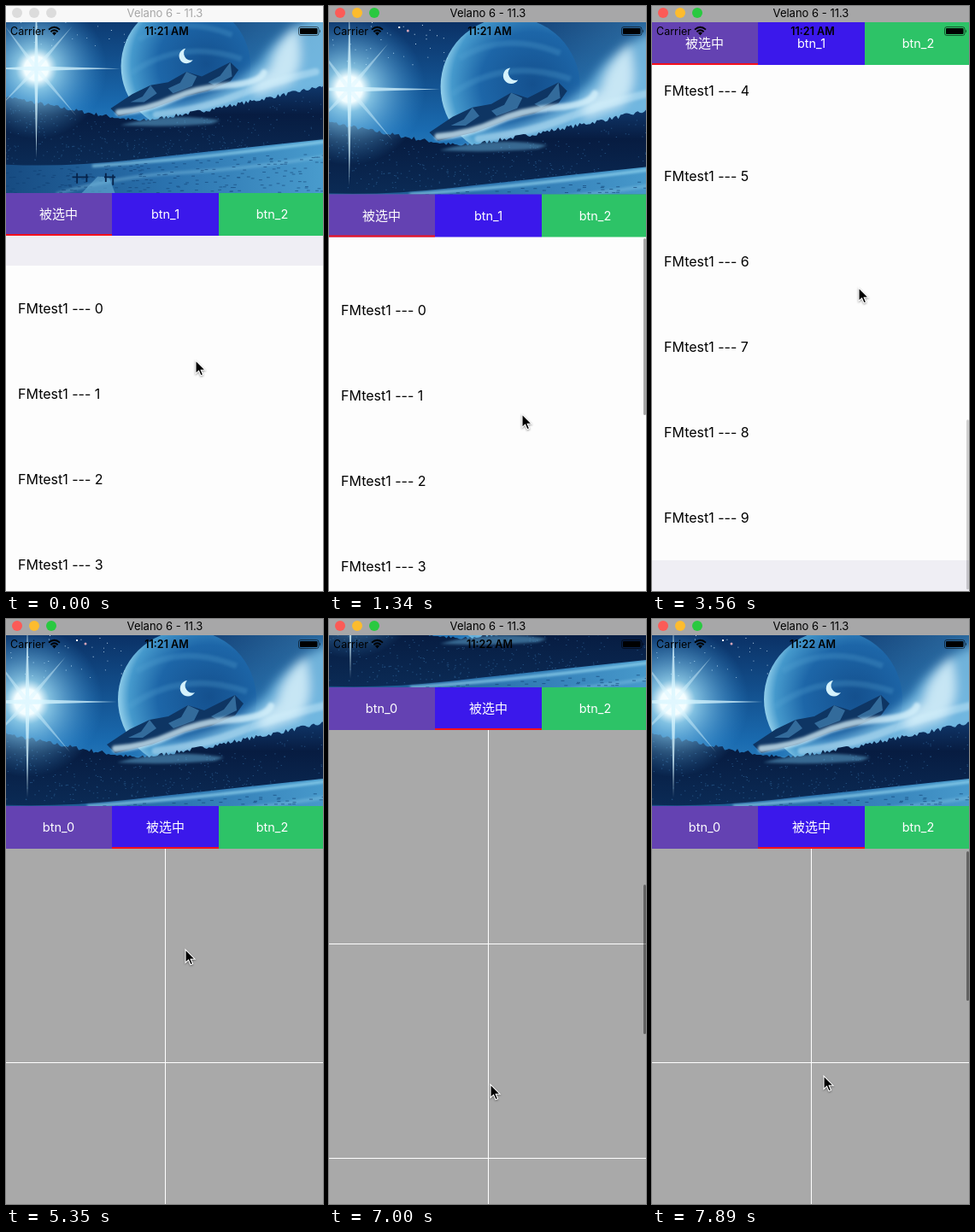
An HTML page that plays this animation: 371 px wide and 685 px high, repeating every 8 s.

```html
<!DOCTYPE html>
<html lang="en">
<head>
<meta charset="utf-8">
<title>Sticky tabs</title>
<style>
html, body { margin: 0; width: 100%; height: 100%; overflow: hidden; background: #fdfdfd; }
#stage { display: block; width: 100vw; height: 100vh; font-family: Inter, "Noto Sans CJK SC", "Noto Sans CJK", "Noto Sans", sans-serif; }
.tab { font-size: 14.5px; fill: #fff; text-anchor: middle; }
.cell { font-size: 16px; fill: #000; white-space: pre; }
.status { font-size: 12.5px; }
</style>
</head>
<body>
<svg id="stage" viewBox="0 0 371 685">
  <defs>
    <linearGradient id="sky" x1="0" y1="0" x2="0" y2="1">
      <stop offset="0" stop-color="#0a2f63"/><stop offset=".5" stop-color="#1a6bb0"/><stop offset="1" stop-color="#59b4e4"/>
    </linearGradient>
    <linearGradient id="east" x1="0" y1="0" x2="1" y2="0">
      <stop offset=".45" stop-color="#4a9fd6" stop-opacity="0"/><stop offset="1" stop-color="#4a9fd6" stop-opacity=".55"/>
    </linearGradient>
    <radialGradient id="planet" cx=".66" cy=".48" r=".68">
      <stop offset="0" stop-color="#14508e"/><stop offset=".55" stop-color="#1d66a8"/><stop offset=".85" stop-color="#4599cc"/><stop offset="1" stop-color="#a5dcf2"/>
    </radialGradient>
    <radialGradient id="glow">
      <stop offset="0" stop-color="#fff"/><stop offset=".17" stop-color="#f2fdff"/><stop offset=".3" stop-color="#a5e2f8" stop-opacity=".75"/><stop offset="1" stop-color="#3c9be0" stop-opacity="0"/>
    </radialGradient>
    <linearGradient id="forest" x1="0" y1="0" x2="0" y2="1">
      <stop offset="0" stop-color="#10386c"/><stop offset=".35" stop-color="#071c41"/><stop offset="1" stop-color="#0b2c57"/>
    </linearGradient>
    <linearGradient id="field" x1="0" y1="0" x2="1" y2="0">
      <stop offset="0" stop-color="#164a80"/><stop offset=".5" stop-color="#2a72ae"/><stop offset="1" stop-color="#4a9dce"/>
    </linearGradient>
    <filter id="soft" x="-30%" y="-50%" width="160%" height="200%"><feGaussianBlur stdDeviation="6"/></filter>
    <filter id="faint" x="-30%" y="-50%" width="160%" height="200%"><feGaussianBlur stdDeviation="1.6"/></filter>
  </defs>

  <rect width="371" height="685" fill="#fdfdfd"/>
  <g id="list">
    <rect id="band" y="269" width="371" height="35" fill="#efeef4"/>
    <rect y="1304" width="371" height="300" fill="#efeef4"/>
  </g>
  <g id="grid">
    <rect y="269" width="371" height="1400" fill="#a9a9a9"/>
    <path d="M186.5 269V1669M0 519.5H371M0 770.5H371M0 1021.5H371" stroke="#fff"/>
  </g>

  <svg id="photo" x="0" width="371" height="200" overflow="hidden">
    <g id="scene">
      <rect x="-20" y="-5" width="411" height="260" fill="url(#sky)"/>
      <rect x="-20" y="-5" width="411" height="260" fill="url(#east)"/>
      <circle cx="212" cy="75" r="81" fill="url(#planet)"/>
      <path d="M153 42Q205 10 270 36M143 84Q205 40 282 66" fill="none" stroke="#5aa9d6" stroke-width="7" opacity=".25" filter="url(#faint)"/>
      <path d="M212 53a9.3 9.3 0 1 0 9 14a8.6 8.6 0 0 1-9-14z" fill="#d5f2fc"/>
      <g filter="url(#soft)">
        <path d="M395 5Q330 25 305 70Q270 105 215 122L150 135L260 140L395 105Z" fill="#8bcdef" opacity=".72"/>
        <path d="M350 25Q322 50 318 78Q285 98 300 112L340 98Q365 78 350 25Z" fill="#e4f7fd" opacity=".75"/>
      </g>
      <path d="M118 128L145 110L168 99L190 95L213 82L232 88L250 79L268 70L278 80L268 94L240 106L210 113L170 128L128 138Z" fill="#0e3563"/>
      <path d="M213 82L205 96L190 103L196 109L220 100L226 88ZM268 70L255 87L240 95L248 99L270 88ZM168 99L158 113L143 120L160 120L176 109Z" fill="#4b8fc2" opacity=".6"/>
      <g fill="none" stroke="#d8f3fc" stroke-linecap="round" filter="url(#faint)">
        <path d="M128 133Q165 130 195 116T265 99T310 83" stroke-width="8" opacity=".75"/>
        <path d="M175 136Q235 128 275 112T375 82" stroke-width="9" opacity=".4"/>
      </g>
      <path id="stars" fill="#d5ecfa"/>
      <path d="M82 5h2v2h-2z" fill="#fff"/><circle cx="93" cy="10" r="1.5" fill="#d7a5b8"/>
      <path id="woods" fill="url(#forest)"/>
      <path id="frost" stroke="#3a78b0" opacity=".5"/>
      <path d="M130 149Q190 132 255 143L245 147Q190 152 130 149Z" fill="#68b4df" opacity=".5" filter="url(#faint)"/>
      <path d="M-20 198Q60 202 140 193T391 166V260H-20Z" fill="url(#field)"/>
      <path d="M95 200Q220 192 391 169" fill="none" stroke="#9bdcf3" stroke-width="3" opacity=".8" filter="url(#faint)"/>
      <path d="M50 235Q130 212 210 208T391 187" fill="none" stroke="#8ccce9" stroke-width="4" opacity=".4" filter="url(#faint)"/>
      <path id="grass" stroke="#0e3c70" opacity=".6"/>
      <path d="M78 238L102 213L116 214L125 238Z" fill="#6fb6dc" opacity=".55"/>
      <path d="M76 222V209M88 220V210M112 220V209M121 224V211M70 214H90M110 214H124" stroke="#06234a" stroke-width="2"/>
      <circle cx="25" cy="78" r="88" fill="url(#glow)"/>
      <g fill="#d8f6ff" opacity=".75">
        <path d="M25 -15L27.500 78L25 190L22.500 78ZM-30 78L25 75L130 78L25 81Z"/>
        <path d="M-14 25L27 76L75 137L23 80ZM70 25L27 80L-20 125L23 76Z" opacity=".6"/>
      </g>
    </g>
  </svg>

  <g id="tabs">
    <rect width="124" height="50" fill="#6442b2"/>
    <rect x="124" width="125" height="50" fill="#3b18eb"/>
    <rect x="249" width="122" height="50" fill="#2dc367"/>
    <text class="tab" x="61.500" y="30"></text>
    <text class="tab" x="186.500" y="30"></text>
    <text class="tab" x="311.500" y="30"></text>
    <rect id="mark" y="48" height="2" fill="#f4101c"/>
  </g>

  <g class="status">
    <text x="5" y="34">Carrier</text>
    <g fill="none" stroke="#000" stroke-width="1.900">
      <path d="M50 27.600Q56.500 21.800 63 27.600M52.400 30.200Q56.500 26.400 60.600 30.200"/>
      <path d="M56.500 34.500L54 31.600Q56.500 29.600 59 31.600Z" fill="#000" stroke="none"/>
    </g>
    <text id="clock" x="188" y="34" text-anchor="middle" font-weight="600"></text>
    <rect x="342.500" y="24.500" width="23.500" height="10" rx="2.500" fill="none" stroke="#000" opacity=".55"/>
    <rect x="344" y="26" width="20.500" height="7" rx="1" />
    <path d="M367 27.500q2 2 0 4z" opacity=".6"/>
  </g>
  <rect id="bar" x="368" width="3" rx="1.500" fill="#000"/>

  <rect id="chrome" width="371" height="19"/>
  <g id="lights"><circle cx="13" cy="8" r="6"/><circle cx="33" cy="8" r="6"/><circle cx="53" cy="8" r="6"/></g>
  <text id="title" x="186" y="13" font-size="13" text-anchor="middle">Velano 6 - 11.3</text>

  <path id="cursor" d="M0 0V15.500L3.600 12.200L6 17.800L8.600 16.700L6.200 11.200H11Z" fill="#000" stroke="#fff" stroke-width="1.100" style="filter:drop-shadow(0 1px 1px #0006)"/>
</svg>
<script>
const $ = id => document.getElementById(id);
const LOOP = 8000, STEP = 148.87, LEAD = 13.5;
const FOCUS = 3, SWITCH = 32, MINUTE = 42;

// [step, offset]; negative offsets pull the header down
const scrollKeys = [
  [0, 0], [2, 0], [3, -15], [4, -40], [5, -58], [6, -62], [7, -35], [8, -10], [9, -1.5],
  [10, 20], [11, 90], [13, 320], [15, 520], [16, 576], [17, 590], [18, 592],
  [20, 660], [21, 685], [22, 680], [23, 664], [24, 655], [25, 655],
  [26, 640], [27, 540], [29, 200], [30, 70], [31, 0], [36, 0],
  [37, -8], [38, -30], [39, -46], [40, -20], [41, -2], [42, 20],
  [44, 130], [45, 175], [46, 165], [47, 139], [48, 75], [49, 10], [50, -25], [51, -14], [53, 0]
];
// [step, x, y]
const cursorKeys = [
  [0, 222, 415], [1, 222, 358], [3, 222, 365], [6, 225, 500], [9, 226, 478], [12, 208, 300],
  [16, 203, 487], [18, 206, 480], [21, 236, 350], [24, 242, 330], [26, 240, 340], [28, 225, 520],
  [30, 205, 400], [32, 190, 240], [33, 190, 240], [36, 210, 387], [39, 206, 500], [41, 204, 520],
  [45, 192, 360], [47, 189, 545], [48, 192, 590], [49, 196, 588], [53, 201, 535]
];

function sample(keys, n, col = 1) {
  const i = keys.findIndex(k => k[0] >= n);
  if (i < 0) return keys[keys.length - 1][col];
  if (i === 0) return keys[0][col];
  const a = keys[i - 1], b = keys[i];
  return a[col] + (b[col] - a[col]) * (n - a[0]) / (b[0] - a[0]);
}

let seed = 7;
const rand = () => (seed = seed * 16807 % 2147483647) / 2147483647;

// Height of the forest edge at x
const ridge = x => 146 - 35 * Math.pow(Math.abs(x - 155) / 190, 1.15);

function buildScene() {
  let d = "M-20 205";
  for (let x = -20; x < 392; x += 2.5) d += `L${x} ${ridge(x) - rand() * 5}`;
  $("woods").setAttribute("d", d + "V205Z");

  const dashes = (count, top, bottom, len) => {
    let p = "";
    for (let i = 0; i < count; i++) {
      const x = rand() * 411 - 20, y = top(x) + rand() * (bottom - top(x));
      p += `M${x.toFixed(1)} ${y.toFixed(1)}h${len}`;
    }
    return p;
  };
  $("frost").setAttribute("d", dashes(420, x => ridge(x) + 6, 198, 1.3));
  $("grass").setAttribute("d", dashes(260, x => 206 - x * .06, 240, 4));

  let s = "";
  for (let i = 0; i < 34; i++) s += `M${(rand() * 140).toFixed(1)} ${(rand() * 50).toFixed(1)}h.9v.9h-.9z`;
  $("stars").setAttribute("d", s);
}

function buildList() {
  for (let i = 0; i < 10; i++) {
    const t = document.createElementNS("http://www.w3.org/2000/svg", "text");
    t.setAttribute("class", "cell");
    t.setAttribute("x", 14);
    t.setAttribute("y", 360 + i * 100);
    t.textContent = `FMtest1 --- ${i}`;
    $("list").append(t);
  }
}

const labels = [...document.querySelectorAll(".tab")];
const lights = [...$("lights").children];
const set = (id, attrs) => {
  for (const k in attrs) $(id).setAttribute(k, attrs[k]);
};
const move = (id, x, y) => set(id, { transform: `translate(${x} ${y})` });

function barOpacity(n) {
  if (n < FOCUS || n === 25 || (n >= SWITCH && n < 37)) return 0;
  if (n === 24) return .18;
  return n < SWITCH ? .35 : .42;
}

function draw(t) {
  const n = Math.floor((t + LEAD) / STEP);
  const s = sample(scrollKeys, n), pull = Math.max(0, -s), down = Math.max(0, s);
  const active = n >= FOCUS, page = n >= SWITCH ? 1 : 0;

  move("list", 0, -s);
  move("grid", 0, -s);
  $("list").style.display = page ? "none" : "";
  $("grid").style.display = page ? "" : "none";
  $("band").style.display = active ? "none" : "";

  const k = active ? 1 + pull / 200 : .935;
  set("photo", { y: 19 - down, height: 200 + pull });
  set("scene", { transform: `translate(${186 * (1 - k)} ${active ? 0 : -18.7}) scale(${k})` });

  move("tabs", 0, Math.max(19, 219 - s));
  labels.forEach((el, i) => {
    el.textContent = i === page ? "被选中" : `btn_${i}`;
    el.style.fontSize = i === page ? "15px" : "";
  });
  set("mark", { x: page * 124, width: 124 + page });

  $("clock").textContent = n >= MINUTE ? "11:22 AM" : "11:21 AM";
  set("bar", {
    y: 272 + down * (page ? .28 : .324),
    height: page ? 175 : 207 - Math.min(8, down / 70),
    opacity: barOpacity(n)
  });

  set("chrome", { fill: active ? "#a7a7a8" : "#f8f8f8" });
  set("title", { fill: active ? "#000" : "#a6a6a6" });
  const hues = active ? ["#fc5b57", "#fdbc2e", "#29c940"] : ["#dcdcdc", "#dcdcdc", "#dcdcdc"];
  lights.forEach((el, i) => el.setAttribute("fill", hues[i]));

  move("cursor", sample(cursorKeys, n, 1), sample(cursorKeys, n, 2));
}

buildScene();
buildList();
const start = performance.now();
function tick() {
  draw((performance.now() - start) % LOOP);
  requestAnimationFrame(tick);
}
tick();
</script>
</body>
</html>
```
